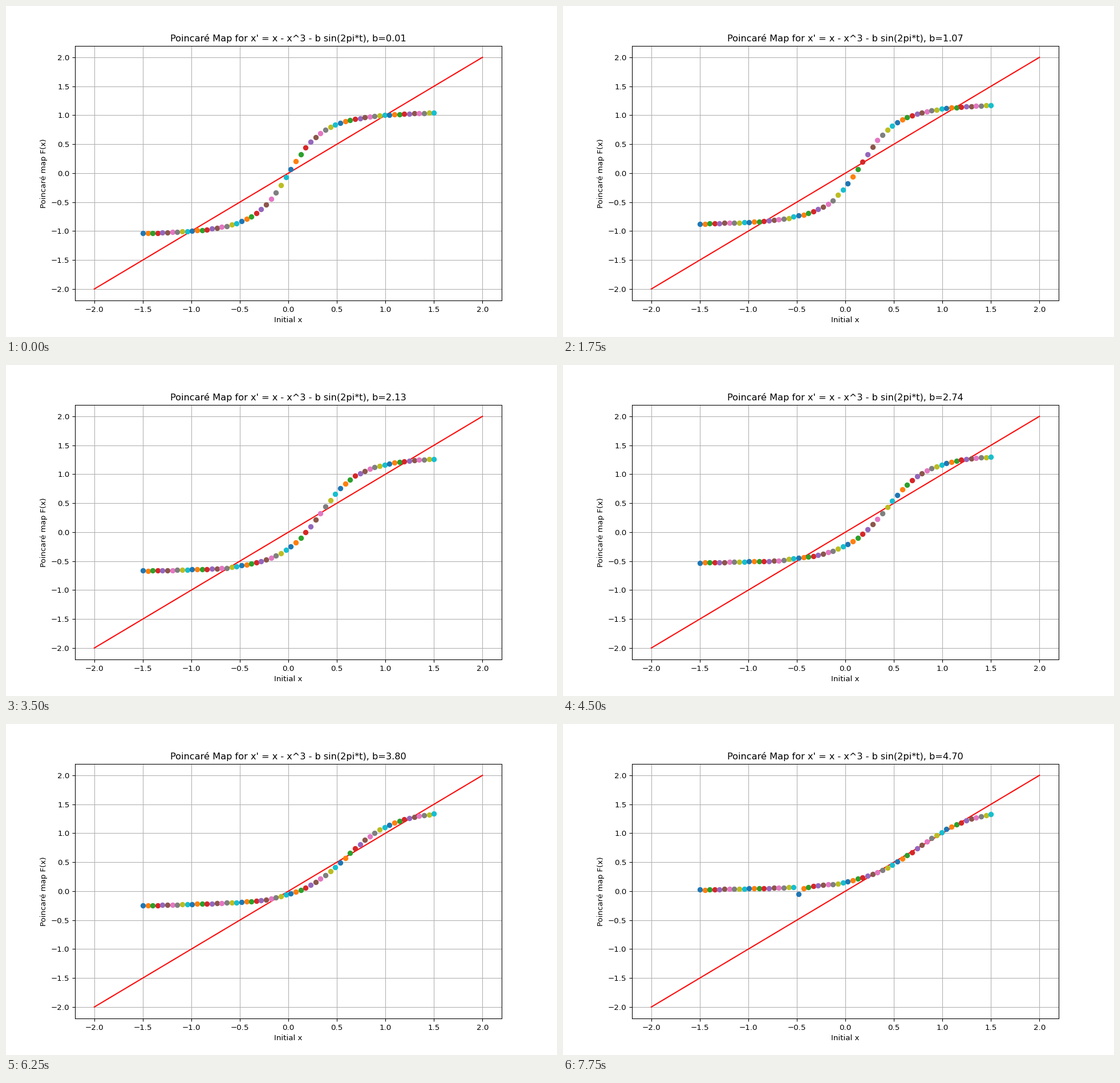
A matplotlib script that plays this animation: 966 px wide and 580 px high, repeating every 8 s.

```python
import math

import numpy as np
import matplotlib.pyplot as plt
from matplotlib.animation import FuncAnimation

FRAMES = 32
INTERVAL = 250
RTOL, ATOL = 1e-3, 1e-6

# Dormand-Prince tableau
C = (0, 1 / 5, 3 / 10, 4 / 5, 8 / 9, 1)
A = (
    (),
    (1 / 5,),
    (3 / 40, 9 / 40),
    (44 / 45, -56 / 15, 32 / 9),
    (19372 / 6561, -25360 / 2187, 64448 / 6561, -212 / 729),
    (9017 / 3168, -355 / 33, 46732 / 5247, 49 / 176, -5103 / 18656),
)
B = (35 / 384, 0, 500 / 1113, 125 / 192, -2187 / 6784, 11 / 84)
E = (-71 / 57600, 0, 71 / 16695, -71 / 1920, 17253 / 339200, -22 / 525, 1 / 40)


def dot(u, v):
    return sum(p * q for p, q in zip(u, v))


def first_step(f, x, slope):
    scale = ATOL + abs(x) * RTOL
    d0, d1 = abs(x) / scale, abs(slope) / scale
    h0 = 1e-6 if min(d0, d1) < 1e-5 else min(0.01 * d0 / d1, 1)
    d2 = abs(f(h0, x + h0 * slope) - slope) / scale / h0
    h1 = (0.01 / max(d1, d2)) ** 0.2
    return min(100 * h0, h1, 1)


def poincare(x, b):
    """State after one forcing period, by adaptive Runge-Kutta 4(5)."""
    def f(t, x):
        return x - x ** 3 - b * math.sin(2 * math.pi * t)

    t, slope = 0.0, f(0.0, x)
    step = first_step(f, x, slope)
    rejected = False
    while t < 1:
        t_new = min(t + step, 1.0)
        h = step = t_new - t
        k = [slope]
        for c, row in zip(C[1:], A[1:]):
            k.append(f(t + c * h, x + h * dot(row, k)))
        x_new = x + h * dot(B, k)
        k.append(f(t_new, x_new))
        scale = ATOL + max(abs(x), abs(x_new)) * RTOL
        err = abs(h * dot(E, k)) / scale
        factor = 0.9 * err ** -0.2 if err else 10
        if err < 1:
            step *= min(factor, 1 if rejected else 10)
            t, x, slope = t_new, x_new, k[-1]
            rejected = False
        else:
            step *= max(0.2, factor)
            rejected = True
    return x


starts = [float(x) for x in np.linspace(-1.5, 1.5, 60)]
forcing = [float(b) for b in np.linspace(0.01, 15, 100)[:FRAMES]]

# 966 x 580 pixels
fig, ax = plt.subplots(figsize=(10, 6.00415), dpi=96.6)
ax.plot([-2, 2], [-2, 2], color="red")
dots = [ax.plot([x], [0], "o", color=f"C{i % 10}")[0]
        for i, x in enumerate(starts)]
ax.set(xlim=(-2.2, 2.2), ylim=(-2.2, 2.2),
       xlabel="Initial x", ylabel="Poincaré map F(x)")
ax.grid(True)
title = ax.set_title("")


def draw(i):
    b = forcing[i]
    for x, marker in zip(starts, dots):
        marker.set_ydata([poincare(x, b)])
    title.set_text(f"Poincaré Map for x' = x - x^3 - b sin(2pi*t), b={b:.2f}")
    return [*dots, title]


anim = FuncAnimation(fig, draw, frames=FRAMES, interval=INTERVAL,
                     repeat=True, repeat_delay=0)
plt.show()
```
